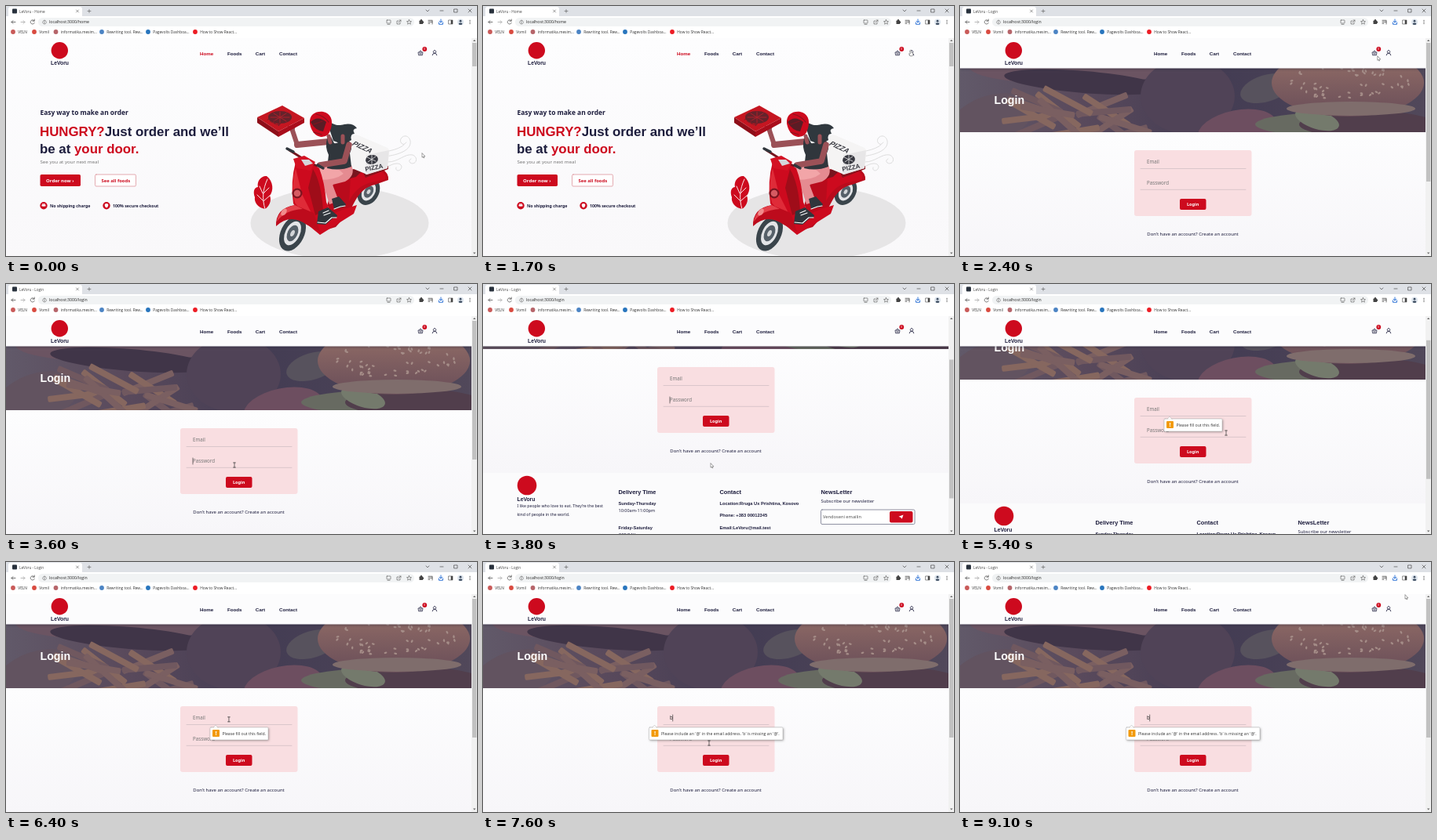
Recreate the animation shown at these times as an HTML page with a canvas. Size 600 by 319 pixels, loop 9200 ms.

```html
<!DOCTYPE html>
<html lang="en">
<head>
<meta charset="utf-8">
<title>LeVoru</title>
<style>
html, body { margin: 0; width: 100%; height: 100%; overflow: hidden; background: #fff; }
canvas { display: block; width: 600px; height: 319px; }
</style>
</head>
<body>
<canvas id="stage"></canvas>
<script>
const canvas = document.getElementById('stage');
const c = canvas.getContext('2d');
const ratio = window.devicePixelRatio || 1;
canvas.width = 600 * ratio;
canvas.height = 319 * ratio;

const LOOP = 9200, LOGIN_AT = 2100;
const RED = '#cd0a1e', INK = '#1c1c3c', GREY = '#777', SKIN = '#9b5157', DARK = '#30363c', PINK = '#f2a5a8';
const ARIAL = '"Liberation Sans", Arial, sans-serif';
const NOTO = '"Noto Sans", sans-serif';
const OPEN = '"Open Sans", sans-serif';

function text(s, x, y, size, color = INK, font = NOTO, weight = 400, align = 'left') {
  c.font = `${weight} ${size}px ${font}`;
  c.fillStyle = color;
  c.textAlign = align;
  c.fillText(s, x, y);
}
const bold = (s, x, y, size, color = INK, align) => text(s, x, y, size, color, ARIAL, 700, align);

function rect(x, y, w, h, fill, r = 0, stroke, lw = 0.6) {
  c.beginPath();
  c.roundRect(x, y, w, h, r);
  if (fill) { c.fillStyle = fill; c.fill(); }
  if (stroke) { c.strokeStyle = stroke; c.lineWidth = lw; c.stroke(); }
}
function oval(x, y, rx, ry, fill, angle = 0) {
  c.beginPath();
  c.ellipse(x, y, rx, ry, angle, 0, 7);
  c.fillStyle = fill;
  c.fill();
}
const dot = (x, y, r, fill) => oval(x, y, r, r, fill);
const shape = (d, fill) => { c.fillStyle = fill; c.fill(new Path2D(d)); };
function line(d, color, lw = 0.8) {
  c.strokeStyle = color;
  c.lineWidth = lw;
  c.lineCap = c.lineJoin = 'round';
  c.stroke(new Path2D(d));
}
function at(x, y, angle, draw, skew = 0) {
  c.save();
  c.translate(x, y);
  c.rotate(angle);
  c.transform(1, 0, skew, 1, 0, 0);
  draw();
  c.restore();
}
function vertical(y0, y1, from, to) {
  const g = c.createLinearGradient(0, y0, 0, y1);
  g.addColorStop(0, from);
  g.addColorStop(1, to);
  return g;
}
function randomizer(seed) {
  return () => (seed = (seed * 16807) % 2147483647) / 2147483647;
}

// Keys are [time, value, ...]; values ease between neighbours.
function track(keys, t) {
  const i = keys.findIndex(k => k[0] > t);
  if (i < 0) return keys[keys.length - 1].slice(1);
  if (i === 0) return keys[0].slice(1);
  const a = keys[i - 1], b = keys[i];
  const u = (t - a[0]) / (b[0] - a[0]), e = u * u * (3 - 2 * u);
  return a.slice(1).map((v, n) => v + (b[n + 1] - v) * e);
}
const pointerKeys = [
  [0, 531, 191], [200, 531, 190], [1300, 545, 60], [2300, 545, 60], [3100, 262, 227],
  [3600, 291, 231], [3800, 291, 232], [4200, 291, 232], [4700, 297, 214], [5000, 297, 214],
  [5400, 339, 190], [6000, 290, 199], [6700, 280, 202], [7100, 296, 252], [7300, 296, 252],
  [7600, 288, 231], [8300, 288, 231], [9100, 568, 45]
];
const scrollKeys = [[3600, 0], [3800, 78], [4000, 78], [4200, 39], [5500, 39], [5700, 0]];
const pointerKinds = [
  [0, 'arrow'], [1200, 'hand'], [2400, 'arrow'], [3000, 'beam'], [3700, 'arrow'], [4600, 'hand'],
  [5200, 'beam'], [7000, 'hand'], [7400, 'beam'], [8400, 'arrow']
];

function drawPointer(t) {
  const [x, y] = track(pointerKeys, t);
  const kind = pointerKinds.filter(k => k[0] <= t).pop()[1];
  at(x, y, 0, () => {
    if (kind === 'beam') {
      line('M-1.4 -3H1.4M0 -3V3M-1.4 3H1.4', '#333', 0.7);
      return;
    }
    const outline = kind === 'arrow'
      ? 'M-1 -3V2.2L.2 1.2L1 3L1.8 2.6L1 .9H2.6Z'
      : 'M-1 -3.5Q0 -4.6 .4 -3.2V-1L2.8 -.2V2L2 3.8H-1L-2.4 .8L-1 .8Z';
    shape(outline, '#fff');
    line(outline, '#444', 0.5);
  });
}

function drawBrowser(login) {
  rect(0, 0, 600, 14, '#dee1e6');
  rect(3, 1, 94, 14, '#fff', [3, 3, 0, 0]);
  rect(0, 13, 600, 28, '#fff');
  rect(8, 3.5, 6, 6, '#29323d', 1);
  text('LeVoru - ' + (login ? 'Login' : 'Home'), 17, 8.7, 4.7, '#444', OPEN);
  line('M89.5 5l3 3m0 -3l-3 3M104 6.5h4M106 4.5v4', '#555', 0.6);
  line('M535 5l2 2l2 -2M553 6h4M589 4l4 4m0 -4l-4 4', '#333', 0.6);
  rect(571, 4, 4, 4, null, 0, '#333');

  rect(41, 15, 479, 11, '#f1f3f4', 5.5);
  line('M12 20.5H7m2 -2l-2 2l2 2', '#555');
  line('M19 20.5h5m-2 -2l2 2l-2 2', '#aaa');
  line('M36 19a2.6 2.6 0 1 0 .2 2.5M36.2 17v2.2H34', '#555');
  line('M49 18.2a2.4 2.4 0 1 0 .1 0M49 20v2M49 19v.1', '#666', 0.6);
  text('localhost:3000/' + (login ? 'login' : 'home'), 55, 22.4, 5.2, '#222', OPEN);
  rect(485, 18, 5, 4, null, 0.5, '#555');
  line('M486 23.4h3M500 19h-2v4h4v-2M500 21l3 -3m-2 0h2v2', '#555', 0.6);
  line('M513.5 17.6l.9 1.9 2.1 .2-1.6 1.4.5 2.1-1.9-1.1-1.9 1.1.5-2.1-1.6-1.4 2.1-.2Z', '#555', 0.6);
  rect(526.5, 18.5, 4.6, 4.6, '#444', 0.7);
  dot(529, 18.2, 1.2, '#444');
  dot(531, 20.8, 1.2, '#444');
  line('M538 18.3h5M538 20.3h5M538 22.3h2M543 19v4', '#444', 0.8);
  line('M554 17v4m-1.8 -1.8l1.8 1.8l1.8 -1.8M551.5 21v2.3h5V21', '#1a66d2', 0.9);
  rect(564, 18, 5, 5, null, 0, '#444');
  rect(566.7, 18, 2.3, 5, '#444');
  dot(579, 20.5, 4, '#dfe6ee');
  dot(579, 19.2, 1.4, '#3e4d61');
  oval(579, 22.7, 2.3, 1.3, '#3e4d61');
  for (let i = 0; i < 3; i++) dot(591, 18.4 + i * 2, 0.6, '#444');

  const marks = [
    [9, 'VELN', '#c95a58'], [36, 'Vomil', '#d94b40'], [63.5, 'informatika.mesim...', '#b6656a'],
    [122, 'Rewriting tool. Rew...', '#4c84c4'], [181, 'Pagevolts Dashboa...', '#2875bd'], [241, 'How to Show React...', '#ed1c24']
  ];
  for (const [x, label, color] of marks) {
    dot(x, 33, 2.9, color);
    text(label, x + 6.3, 34.8, 4.8, '#333', OPEN);
  }
}

function drawScrollbar(y, h) {
  rect(593, 41, 7, 278, '#f1f1f1');
  rect(594, y, 5.4, h, '#c1c1c1');
  shape('M595 45l1.7 -2l1.7 2Z', '#666');
  shape('M595 314.5l1.7 2l1.7 -2Z', '#666');
}

function drawHeader(login) {
  if (login) {
    c.save();
    c.shadowColor = 'rgba(30,30,50,.35)';
    c.shadowBlur = 3 * ratio;
    c.shadowOffsetY = ratio;
    rect(0, 41, 593, 38.5, '#fcfcfd');
    c.restore();
  }
  dot(68.3, 56.8, 10.7, RED);
  bold('LeVoru', 68.5, 75.3, 6.8, INK, 'center');
  [['Home', 247], ['Foods', 282], ['Cart', 317.7], ['Contact', 348]].forEach(([label, x], i) =>
    bold(label, x, 63, 6.2, !login && !i ? RED : INK));
  line('M525.4 59h5.6l-.6 3.8h-4.4ZM526.6 58.6l1.4 -1.8l1.5 1.8M527.2 60v2M529 60v2', INK, 0.7);
  dot(533.3, 55, 2.9, RED);
  text('0', 533.3, 56.3, 3.6, '#fff', ARIAL, 400, 'center');
  line('M546 56.6a1.8 1.8 0 1 0 .1 0M543.2 62.8q.2 -2.6 2.8 -2.6t2.8 2.6', INK, 0.8);
}

function drawWheel(x, y, rx, ry, angle) {
  oval(x, y, rx, ry, '#3a444b', angle);
  oval(x, y, rx * 0.62, ry * 0.68, '#e3e4e7', angle);
  oval(x, y, rx * 0.42, ry * 0.46, '#566069', angle);
  oval(x, y, rx * 0.16, ry * 0.18, '#d3d5d8', angle);
}

function drawScooter() {
  oval(425, 277, 113.5, 46, '#e6e5e6');
  line('M483 192C500 190 517 184 515 172C512 161 500 167 503 174Q506 179 510 174M487 199C500 199 508 188 518 190C527 194 521 204 515 200Q512 197 516 195M485 206C493 200 503 199 504 205C503 212 495 211 497 206M488 185Q502 182 507 177', '#dadada', 0.9);
  shape('M330 259C320 257 316 250 317 244C314 236 317 231 321 231C319 223 326 216 332 217C341 224 341 236 336 242C339 248 335 256 330 259Z', RED);
  line('M330 259C326 246 327 234 333 221M327 248l-7 -7M327 239l-4 -9M328 249l8 -7M328 239l7 -7', '#fff', 0.9);

  // Rear wheel, seat body and delivery box
  drawWheel(462, 237, 13, 18, 0.5);
  shape('M418 222C432 206 455 205 478 207Q488 213 487 222L470 228C452 232 446 246 438 262L420 282L400 288Z', '#b90b1c');
  shape('M439 218Q458 209 478 211Q485 215 483 221L462 226Q446 231 437 249Z', RED);
  shape('M417 213Q434 204 453 211L446 218L424 224Z', '#78151e');
  shape('M455 213L487 204V208L458 219Z', '#87131d');
  shape('M434 188L441 167Q444 163 449 165L486 181Q489 183 488 188L486 207L460 215L443 208Z', '#f5f4f4');
  shape('M459 190L488 184L486 207L458 215Z', '#e7e6e7');
  oval(466, 196, 8, 6, '#373840', -0.2);
  line('M460 193l11 5M461 199l10 -7M466 190v12', '#eee', 0.8);
  at(458, 211, -0.19, () => bold('PIZZA', 0, 0, 8, '#373840'));
  at(440, 177, 0.43, () => bold('PIZZA', 0, 0, 9, '#373840'), -0.4);

  // Rider
  shape('M408 145C416 150 420 154 431 151Q442 149 447 156Q440 157 444 163Q438 163 440 171Q429 178 417 172Z', '#30383e');
  line('M364 156L371 177', SKIN, 6);
  line('M371 177L411 173', SKIN, 8);
  line('M365 159L360 154M366 159L368 151', SKIN, 2.5);
  shape('M410 204L440 203Q446 216 432 224L416 228L424 249L412 253L402 222Z', '#e58b91');
  shape('M408 205Q424 206 430 214Q420 222 400 222L397 225Q397 240 411 257L401 262Q384 246 383 226Q384 207 408 205Z', PINK);
  shape('M409 169L414 167L418 175Q424 176 428 169L436 171Q443 178 438 188L440 205Q425 211 409 207L411 190Q406 180 409 169Z', DARK);
  line('M437 177L431 198L400 203', SKIN, 7.5);
  line('M411 166L413 174M429 166L429 174', SKIN, 5);
  shape('M387 150C386 138 395 134 404 135C414 137 417 146 414 156Q411 168 401 167Q390 165 387 150Z', RED);
  shape('M388 148Q397 139 408 148L404 160Q394 159 388 148Z', '#5a1c25');
  line('M395 138Q405 140 411 148M392 161l10 3M392 151l11 -4', '#85141f', 1.2);

  // Front wheel, shield and footboard
  drawWheel(365, 290, 15, 24, 0.45);
  shape('M369 199Q384 196 399 207Q406 225 408 250L414 266L434 258L447 254L443 265L400 292L383 278L366 252Q362 225 369 199Z', RED);
  shape('M369 207Q362 230 368 251L384 272L391 268L377 240Z', '#df2b38');
  shape('M391 208Q402 226 404 262L394 267L385 232Z', '#9f0d19');
  shape('M344 281Q343 258 368 254L392 264L400 288L383 279Q362 264 344 281Z', '#bd0b1c');
  shape('M345 275Q348 258 368 254L378 259Q356 260 345 275Z', '#e4404a');
  line('M361 184L385 199L396 204', '#78151e', 3);
  line('M358 182L366 186M397 203L404 207', DARK, 3.5);
  shape('M366 195L380 191L394 199L388 210L370 207Z', '#d41224');
  shape('M376 196L386 196L391 201L381 204Z', '#d5d7db');
  dot(371, 239, 6.5, '#7d1420');
  dot(371, 239, 4.3, '#d65a62');
  oval(354, 263, 3, 5, '#f18b8b', 0.6);
  shape('M415 246L424 243L433 253Q432 257 426 257L418 259Z', DARK);
  shape('M398 262L410 257L422 267Q422 271 416 271L407 279L396 278Z', DARK);
  line('M397 276L407 277L415 270H421M404 264l7 -3M405 267l8 -3M418 259L426 256L432 255', '#fff', 1.1);

  // Carried pizza box
  shape('M320 142L347 160V167L320 149Z', '#8e0e19');
  shape('M347 160L380 143V149L347 167Z', '#a90d1b');
  shape('M320 142L352 127L380 143L347 160Z', '#c51621');
  at(349, 142, 0, () => {
    oval(0, 0, 15, 8, '#64232b');
    line('M-12 0H12M-8 -5L8 5M-8 5L8 -5M0 -7V7', '#b5212c', 0.9);
  });
  at(332, 145, 0.5, () => bold('PIZZA', 0, 0, 6, '#64232b'), -0.6);
}

function drawHome() {
  rect(0, 41, 593, 278, vertical(41, 319, '#fdfdfe', '#f9f8fa'));
  drawScooter();
  text('Easy way to make an order', 43.5, 138.5, 8.4, INK, NOTO, 600);
  const size = 16.85;
  bold('HUNGRY?', 43, 166, size, RED);
  const w = c.measureText('HUNGRY?').width;
  bold('Just order and we’ll', 43 + w, 166, size);
  bold('be at ', 43, 187.8, size);
  bold('your door.', 43 + c.measureText('be at ').width, 187.8, size, RED);
  text('See you at your next meal', 43.5, 201, 6.15, GREY);
  rect(43.5, 215, 51.5, 15, RED, 1.8);
  text('Order now ›', 51, 224.5, 6, '#fff', NOTO, 700);
  rect(113.5, 215, 52, 15, '#fff', 1.5, '#d98991', 0.7);
  text('See all foods', 121.5, 224.5, 5.9, RED, NOTO, 600);
  dot(48, 254.7, 4.7, RED);
  rect(45.5, 253.2, 5, 2.5, '#fff', 0.8);
  line('M46.5 252.7h3', '#fff', 0.8);
  dot(46.8, 256, 0.6, RED);
  dot(49.2, 256, 0.6, RED);
  dot(128, 254.7, 4.7, RED);
  shape('M128 251.9l2.2 .9v2q-.4 2 -2.2 2.8q-1.8 -.8 -2.2 -2.8v-2Z', '#fff');
  text('No shipping charge', 56, 256.8, 5.3, INK, NOTO, 600);
  text('100% secure checkout', 136, 256.8, 5.3, INK, NOTO, 600);
  drawHeader(false);
  drawScrollbar(47, 30);
}

function drawBanner() {
  c.save();
  c.beginPath();
  c.rect(0, 79, 593, 82);
  c.clip();
  const g = c.createLinearGradient(0, 0, 593, 0);
  [[0, '#615969'], [0.25, '#5a4a5c'], [0.55, '#433c53'], [1, '#51485a']].forEach(s => g.addColorStop(...s));
  rect(0, 79, 593, 82, g);
  oval(142, 78, 130, 22, '#6b5462');
  oval(158, 97, 102, 14, '#403548', 0.08);
  oval(40, 144, 54, 30, '#625360', -0.3);
  oval(290, 115, 60, 48, '#504357');
  const rnd = randomizer(19);
  for (let i = 0; i < 17; i++) {
    at(88 + rnd() * 130, 121 + rnd() * 44, -0.6 + rnd() * 1.35, () =>
      rect(-35, -4, 70, 8, ['#86675f', '#7a5f61', '#70585f'][i % 3], 2));
  }
  oval(353, 158, 51, 25, '#6d4e60', -0.2);
  oval(390, 105, 34, 17, '#57525d', -0.3);
  oval(489, 151, 113, 16, '#676a61');
  oval(519, 151, 87, 17, '#513e4c');
  oval(455, 145, 29, 12, '#747a6c', 0.3);
  oval(494, 98, 97, 43, vertical(72, 142, '#8d6965', '#684d58'));
  oval(498, 131, 82, 9, '#7f6d6c');
  for (let i = 0; i < 65; i++) {
    const a = rnd() * 6.3, r = Math.sqrt(rnd());
    oval(500 + Math.cos(a) * r * 79, 95 + Math.sin(a) * r * 26, 2, 1.2, '#a58d88', rnd() * 3);
  }
  c.restore();
  bold('Login', 43.5, 124.5, 14.2, '#fff');
}

function drawFooter() {
  rect(0, 319, 593, 150, '#fbfbfc');
  dot(56, 335, 12.3, RED);
  bold('LeVoru', 43.5, 354.8, 6.8);
  text('I like people who love to eat. They’re the best', 43.5, 363.3, 5.2);
  text('kind of people in the world.', 43.5, 374.3, 5.2);
  bold('Delivery Time', 172.5, 346, 7.4);
  bold('Sunday-Thursday', 172.5, 360, 5.7);
  text('10:00am-11:00pm', 172.5, 369, 5.5);
  bold('Friday-Saturday', 172.5, 391, 5.7);
  text('OFF DAY', 172.5, 400, 5.5);
  bold('Contact', 301.5, 346, 7.4);
  bold('Location:Rruga Ux Prishtina, Kosovo', 301.5, 359.7, 5.7);
  bold('Phone: +383 00012345', 301.5, 375.3, 5.7);
  bold('Email:LeVoru@mail.test', 301.5, 391, 5.7);
  bold('NewsLetter', 430.5, 346, 7.4);
  text('Subscribe our newsletter', 430.5, 356.5, 5.8);
  rect(430.5, 366, 119.5, 18.5, '#fff', 1.5, '#74778c', 0.8);
  text('Vendoseni emailin', 433, 377, 5.7, '#555');
  rect(518, 368, 29.5, 14.5, RED, 2);
  shape('M529.5 374.8l6 -2.3l-1.8 5.2l-1.4 -1.8Z', '#fff');
}

function drawBubble(x, w, message) {
  c.save();
  c.shadowColor = 'rgba(0,0,0,.35)';
  c.shadowBlur = 3 * ratio;
  c.shadowOffsetX = c.shadowOffsetY = ratio;
  rect(x, 211, w, 16, '#fff', 1.2);
  c.restore();
  rect(x, 211, w, 16, '#fff', 1.2, '#aaa', 0.5);
  const tip = `M${x + 4} 211.4l3 -3.2l3 3.2`;
  shape(tip, '#fff');
  line(tip, '#aaa', 0.5);
  rect(x + 3, 214, 9, 9, '#f29a0b', 1);
  bold('!', x + 7.5, 221.4, 8, '#fff', 'center');
  text(message, x + 15.5, 221.2, 5.2, '#333', OPEN);
}

function drawLogin(t) {
  const [scroll] = track(scrollKeys, t);
  const typed = t >= 6600;
  c.save();
  c.translate(0, -scroll);
  rect(0, 79, 593, 240, vertical(161, 319, '#fdfdfe', '#f7f6f9'));
  drawBanner();
  rect(222, 184, 149.5, 84, '#f9dee1', 3);
  text(typed ? 'b' : 'Email', 238, 201, 6.2, typed ? '#222' : GREY);
  text('Password', 238, 228, 6.2, GREY);
  line('M230 207.5H364M230 234.3H364', '#cdbcc2', 0.7);
  const blinkOn = (t - 3300 + 2 * 1060) % 1060 < 530;
  if (t >= 3100 && blinkOn) {
    const inEmail = t >= 4800;
    const x = typed ? 241.7 : 238, y = inEmail ? 195 : 222;
    line(`M${x} ${y}v8`, '#222', 0.6);
  }
  rect(280, 246, 33.5, 14, RED, 2);
  text('Login', 296.7, 254.8, 5.6, '#fff', NOTO, 600, 'center');
  text('Don’t have an account? Create an account', 296.5, 293, 5.95, INK, NOTO, 400, 'center');
  drawFooter();
  if (t >= 4800 && t < 6600) drawBubble(260, 74, 'Please fill out this field.');
  if (t >= 7200) drawBubble(211.5, 170.5, "Please include an '@' in the email address. 'b' is missing an '@'.");
  c.restore();
  drawHeader(true);
  drawScrollbar(47 + scroll * 0.635, 177);
}

function render(now) {
  const t = Math.floor((now % LOOP) / 100) * 100;
  const login = t >= LOGIN_AT;
  c.setTransform(ratio, 0, 0, ratio, 0, 0);
  rect(0, 0, 600, 319, '#fff');
  if (login) drawLogin(t); else drawHome();
  drawBrowser(login);
  drawPointer(t);
}

let start;
function tick(now) {
  start ??= now;
  render(now - start);
  requestAnimationFrame(tick);
}
render(0);
requestAnimationFrame(tick);
</script>
</body>
</html>
```
